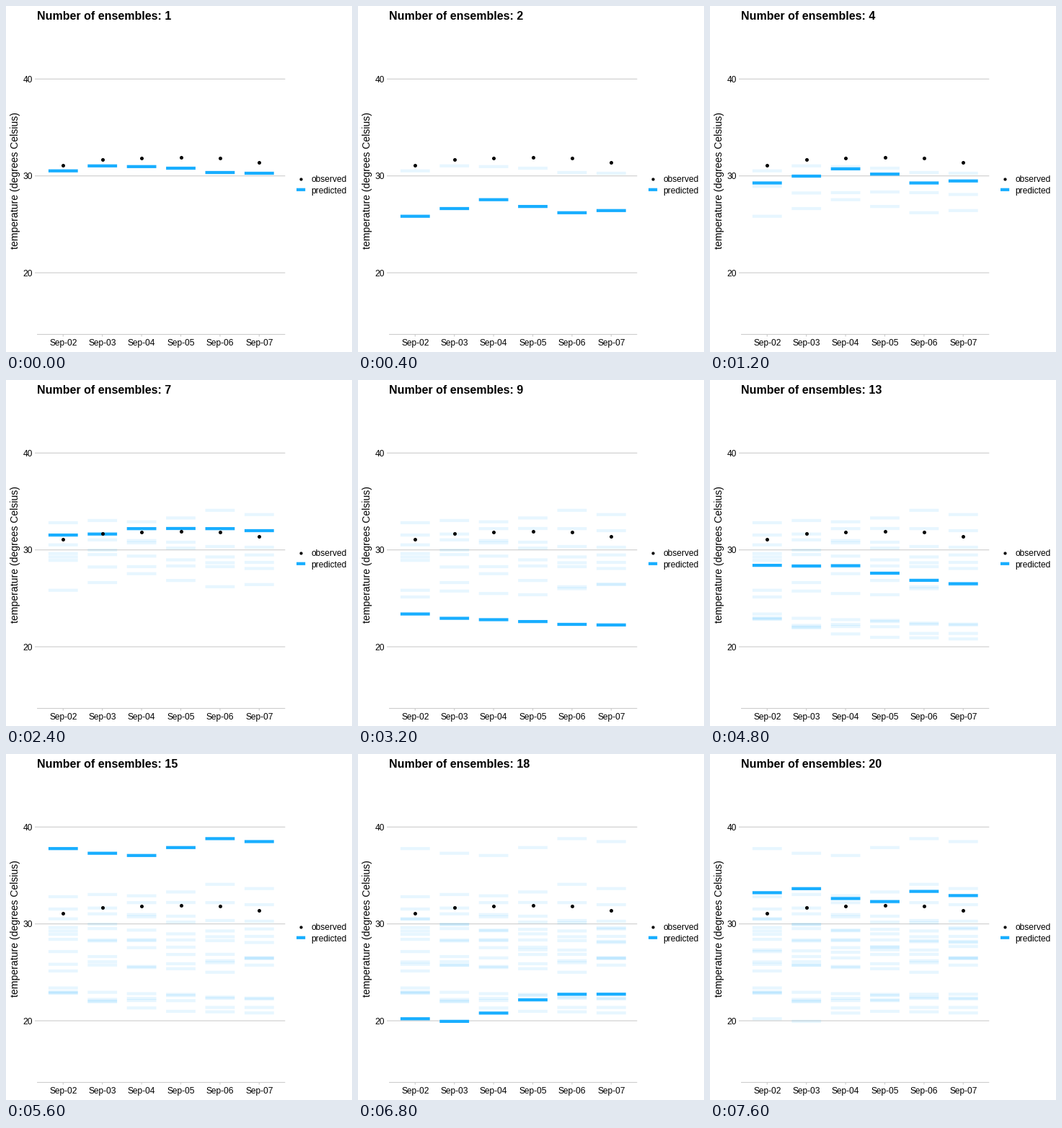
A matplotlib script for the animation above (8000 ms loop, 480 by 480 pixels).

```python
import matplotlib.pyplot as plt
import numpy as np
from matplotlib.animation import FuncAnimation

SIZE, DPI = 480, 100
PX = 72 / DPI  # points per pixel
BLUE, GREY = "#18AEFF", "#CCCCCC"
LEFT, RIGHT, BASE = 43, 387.3, 455.6

DAYS = 79.3 + 54.4 * np.arange(6)
HALF_BAR = 20.4
OBSERVED = [220.7, 212.6, 211.2, 210.3, 210.9, 217.1]

# One row per ensemble, one column per day, as heights on the stage.
PREDICTED = np.array([
    [228.7, 221.8, 222.8, 225.0, 231.0, 232.0],
    [291.7, 281.0, 268.7, 278.1, 286.8, 283.8],
    [250.2, 259.4, 258.9, 258.0, 258.9, 261.5],
    [245.5, 236.0, 225.9, 233.2, 245.5, 242.7],
    [198.0, 194.9, 196.7, 191.4, 180.8, 186.7],
    [240.7, 242.2, 244.3, 249.5, 253.5, 253.0],
    [215.1, 213.7, 206.2, 206.0, 206.2, 209.0],
    [301.0, 292.8, 296.2, 297.9, 289.5, 283.2],
    [324.6, 330.6, 332.5, 335.1, 339.0, 339.8],
    [330.0, 340.5, 352.3, 357.0, 357.7, 359.2],
    [332.0, 342.7, 342.0, 342.2, 351.6, 351.6],
    [331.0, 343.8, 339.0, 333.5, 337.3, 338.7],
    [257.1, 258.0, 257.6, 268.0, 277.9, 282.6],
    [274.1, 288.2, 294.8, 291.0, 302.8, 292.9],
    [131.2, 137.7, 140.8, 129.8, 117.4, 121.5],
    [229.0, 237.0, 245.2, 243.3, 234.2, 241.2],
    [288.5, 293.0, 282.9, 271.6, 272.0, 260.0],
    [367.3, 370.9, 359.4, 341.0, 333.3, 333.2],
    [271.8, 273.1, 275.0, 267.5, 260.4, 267.0],
    [192.4, 186.8, 200.5, 204.7, 190.6, 196.4],
])

plt.rcParams["font.family"] = "Liberation Sans"
fig = plt.figure(figsize=(SIZE / DPI, SIZE / DPI), dpi=DPI, facecolor="white")
ax = fig.add_axes([0, 0, 1, 1])
ax.set(xlim=(0, SIZE), ylim=(SIZE, 0))
ax.axis("off")


def rule(x, y, color=GREY, width=1.1, z=1):
    ax.plot(x, y, color=color, lw=width * PX, solid_capstyle="butt",
            snap=False, zorder=z)


def label(x, y, text, size=12, **kw):
    return ax.text(x, y, text, fontsize=size * PX, color="black",
                   **{"va": "baseline", **kw})


def dots(x, y, size):
    ax.plot(x, y, "o", color="black", ms=size * PX, mew=0, snap=False, zorder=5)


def bars(heights, alpha, z):
    heights = np.ravel(heights)
    x = np.resize(DAYS, heights.size)
    segments = [[(a - HALF_BAR, h), (a + HALF_BAR, h)]
                for a, h in zip(x, heights)]
    lines = ax.hlines([], 0, 1, colors=BLUE, lw=4.25 * PX, alpha=alpha, zorder=z)
    lines.set_segments(segments)
    lines.set_snap(False)
    lines.set_capstyle("butt")
    return lines


for value, y in ((40, 101.3), (30, 235.7), (20, 370.1)):
    rule([LEFT - 3, RIGHT], [y, y])
    label(36.7, y + 4.5, value, ha="right")

rule([LEFT, RIGHT], [BASE, BASE])
for i, x in enumerate(DAYS):
    rule([x, x], [BASE, BASE + 3])
    label(x, 471, f"Sep-{i + 2:02d}", ha="center")

label(17, 242.5, "temperature (degrees Celsius)", 14, rotation=90,
      ha="right", va="center", rotation_mode="default").set_position((19.8, 242.5))

dots([409], [239.5], 4.2)
rule([403, 415.2], [254.8, 254.8], BLUE, 4.25)
label(423.2, 244, "observed")
label(423.2, 260, "predicted")

dots(DAYS, OBSERVED, 5)
title = label(LEFT, 19, "", 16, weight="bold")
past = bars([], 0.1, 3)
current = bars([], 1, 4)


def bar_segments(heights):
    x = np.resize(DAYS, heights.size)
    return [[(a - HALF_BAR, h), (a + HALF_BAR, h)]
            for a, h in zip(x, heights.ravel())]


def update(i):
    title.set_text(f"Number of ensembles: {i + 1}")
    past.set_segments(bar_segments(PREDICTED[:i]))
    current.set_segments(bar_segments(PREDICTED[i]))
    return title, past, current


anim = FuncAnimation(fig, update, frames=len(PREDICTED), interval=400,
                     repeat=True, repeat_delay=0)
plt.show()
```
